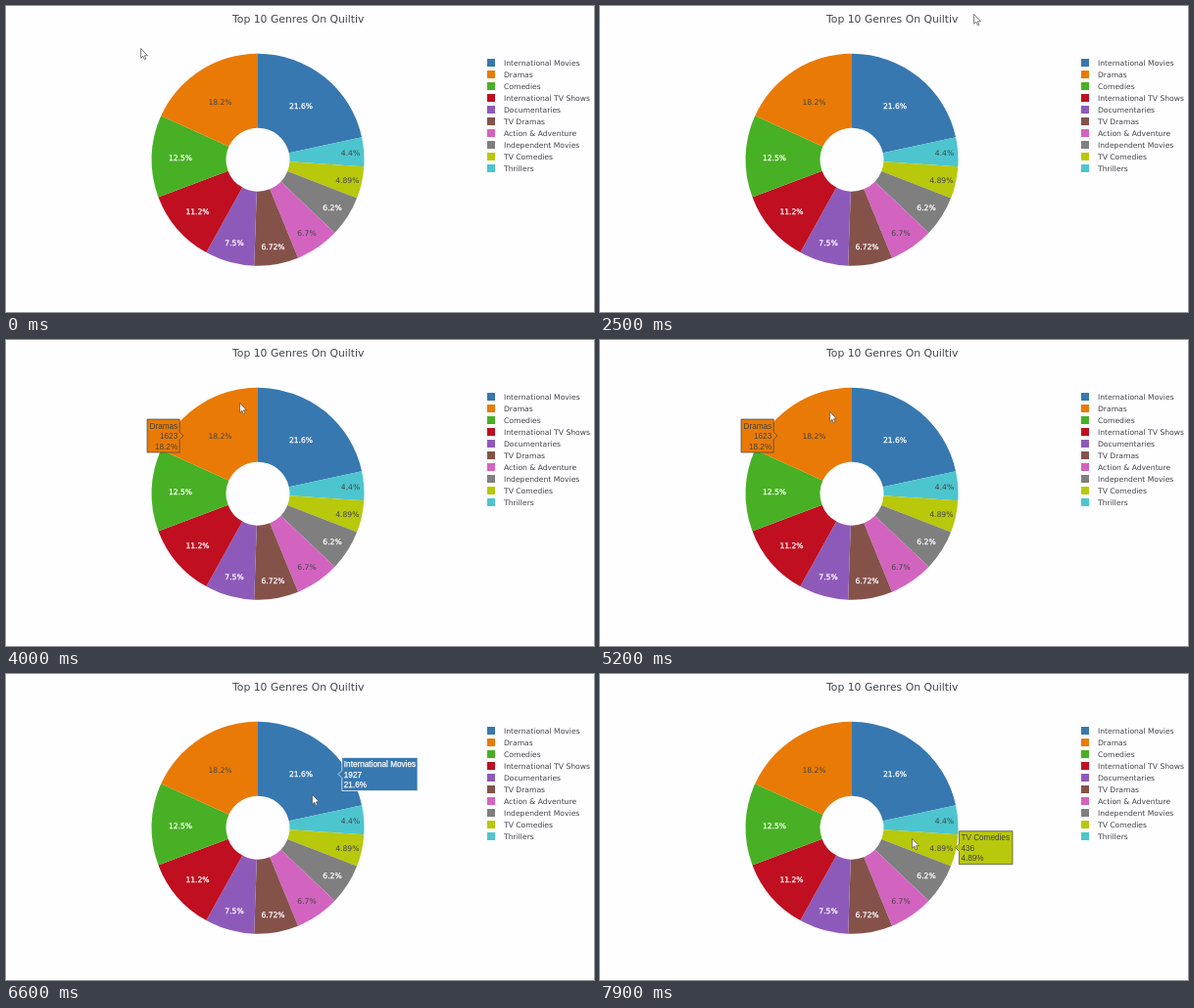
Animation of 600 by 313 pixels, one loop 8000 ms. Source, as an HTML page:

```html
<!DOCTYPE html>
<html lang="en">
<head>
<meta charset="utf-8">
<title>Top 10 Genres</title>
<style>
html, body { margin: 0; width: 100%; height: 100%; overflow: hidden; background: #fefdff; }
svg { display: block; width: 600px; height: 313px; }
text { font: 7.63px "DejaVu Sans", sans-serif; fill: #444; white-space: pre; }
.title { font-size: 10.82px; }
.light { fill: #fff; stroke: #fff; stroke-width: .25px; }
.tip text { font: 8.2px "Liberation Sans", Arial, sans-serif; }
</style>
</head>
<body>
<svg id="stage" viewBox="0 0 600 313">
  <text class="title" x="231" y="17">Top 10 Genres On Quiltiv</text>
  <g id="pie"></g>
  <g id="legend"></g>
  <g id="tips"></g>
  <path id="cursor" d="M-.4 .4V10.2L1.8 8.2L3.4 11.8L4.9 11.1L3.4 7.7H6.4Z" fill="#fff" stroke="#555" stroke-width=".75"/>
</svg>
<script>
const $ = id => document.getElementById(id);

function add(parent, tag, attrs, text) {
  const el = document.createElementNS('http://www.w3.org/2000/svg', tag);
  for (const k in attrs) el.setAttribute(k, attrs[k]);
  if (text) el.textContent = text;
  parent.append(el);
  return el;
}

// name, share in percent, colour, label centre, light label
const genres = [
  ['International Movies', 21.6, '#3778b0', 301, 102.7, 1],
  ['Dramas', 18.2, '#e97a05', 218.5, 98.5, 0],
  ['Comedies', 12.5, '#48b024', 178, 155.2, 1],
  ['International TV Shows', 11.2, '#bf0f20', 195.5, 210.5, 1],
  ['Documentaries', 7.5, '#8e5aba', 233, 242.3, 1],
  ['TV Dramas', 6.72, '#85524a', 272.5, 246, 1],
  ['Action & Adventure', 6.7, '#d264c0', 307, 232, 0],
  ['Independent Movies', 6.2, '#7f7f7f', 333, 206.5, 1],
  ['TV Comedies', 4.89, '#b8c80a', 348.3, 178, 0],
  ['Thrillers', 4.4, '#4dc5cf', 351.5, 150.5, 0]
];

const cx = 257, cy = 157.2, outer = 108.5, inner = 32.5;
const total = genres.reduce((sum, g) => sum + g[1], 0);
const polar = (r, a) => `${cx + r * Math.sin(a)} ${cy - r * Math.cos(a)}`;

function drawSlice([, share, fill, x, y, light], a, b) {
  const d = `M${polar(outer, a)}A${outer} ${outer} 0 0 1 ${polar(outer, b)}` +
    `L${polar(inner, b)}A${inner} ${inner} 0 0 0 ${polar(inner, a)}Z`;
  add($('pie'), 'path', { d, fill });
  add($('pie'), 'text', { x, y: y + 2.7, 'text-anchor': 'middle', class: light ? 'light' : '' }, share + '%');
}

// The largest slice comes first, the others follow from smallest to largest.
let angle = 0;
for (const g of [genres[0], ...genres.slice(1).reverse()]) {
  const end = angle + g[1] / total * 2 * Math.PI;
  drawSlice(g, angle, end);
  angle = end;
}

genres.forEach(([name, , fill], i) => {
  const y = 54 + i * 12;
  add($('legend'), 'rect', { x: 491, y, width: 8, height: 8, fill });
  add($('legend'), 'text', { x: 508, y: y + 6.7 }, name);
});

// Hover box; side is 1 when it opens to the right of its arrow
function makeTip(index, count, x, y, width, side) {
  const [name, share, fill, , , light] = genres[index];
  const g = add($('tips'), 'g', { class: 'tip' });
  const near = x + side * 3.8, far = near + side * width;
  add(g, 'path', {
    d: `M${x} ${y}L${near} ${y - 3.8}V${y - 17}H${far}V${y + 17}H${near}V${y + 3.8}Z`,
    fill, stroke: light ? '#fff' : '#444', 'stroke-width': .7
  });
  [name, count, share + '%'].forEach((line, i) => add(g, 'text', {
    x: near + side * 2, y: y - 7.3 + i * 10.4,
    'text-anchor': side > 0 ? 'start' : 'end', class: light ? 'light' : ''
  }, line));
  return g;
}

const movies = makeTip(0, 1927, 339, 102.5, 77.2, 1);
const dramas = makeTip(1, 1623, 181, 98, 33.2, -1);
const thrillers = makeTip(9, 392, 364.6, 150.3, 34.6, 1);
const comedies = makeTip(8, 436, 362.6, 177.7, 54.6, 1);

const hovers = [
  [dramas, 3800, 5500],
  [movies, 5500, 6800],
  [thrillers, 6800, 7300],
  [comedies, 7300, 8000]
];

// time, x, y
const path = [
  [0, 138, 43], [1800, 138, 43], [1900, 382, 8], [2500, 382, 8],
  [2900, 345, 1], [3300, 298, 4], [3600, 270, 61], [3800, 247, 66],
  [4200, 231, 61], [4700, 226, 70], [5200, 235, 73], [5500, 259, 80],
  [5900, 300, 98], [6200, 304, 100], [6400, 305, 101], [6800, 320, 144],
  [7200, 320, 162], [7500, 319, 168], [8000, 319, 168]
];

function cursorAt(t) {
  const i = path.findIndex(p => p[0] > t);
  const [t0, x0, y0] = path[i - 1], [t1, x1, y1] = path[i];
  const k = (t - t0) / (t1 - t0);
  return [x0 + (x1 - x0) * k, y0 + (y1 - y0) * k];
}

function render(now) {
  const t = Math.floor(now % 8000 / 100) * 100;
  $('cursor').setAttribute('transform', `translate(${cursorAt(t).map(Math.round)})`);
  for (const [tip, from, to] of hovers) {
    tip.style.display = t >= from && t < to ? '' : 'none';
  }
}

const start = performance.now();
function loop() {
  render(performance.now() - start);
  requestAnimationFrame(loop);
}
loop();
</script>
</body>
</html>
```
